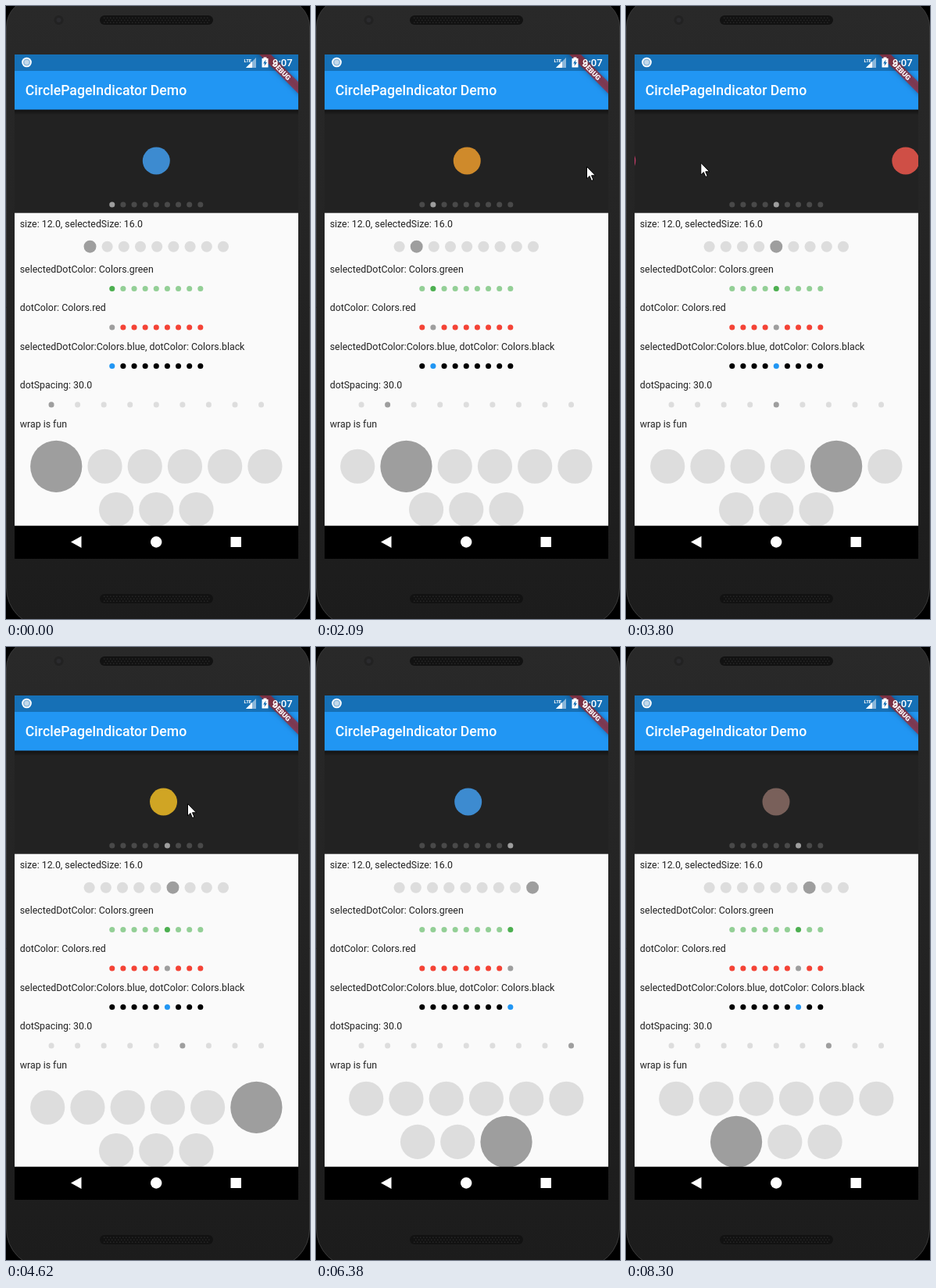
An HTML page with a canvas that plays this animation: 389 px wide and 784 px high, repeating every 9.31 s.

```html
<!DOCTYPE html>
<html lang="en">
<head>
<meta charset="utf-8">
<title>CirclePageIndicator Demo</title>
<style>
  html, body { margin: 0; width: 100%; height: 100%; overflow: hidden; background: #000; }
  canvas { display: block; }
</style>
</head>
<body>
<canvas id="stage" width="389" height="784"></canvas>
<script>
const ctx = document.getElementById('stage').getContext('2d');
const LOOP = 9310;
const DP = 363 / 411;               // device pixels to stage pixels
const LEFT = 11, RIGHT = 374, WIDTH = RIGHT - LEFT, MID = 192.3;
const APP_BAR = 83, CAROUSEL = 132.5, SAMPLES = 264.7, NAV = 664.7;
const GREY = '#9e9e9e', PALE = '#dddddd';
const PAGES = ['#3d8bd0', '#cf8a2b', '#53a456', '#cc3d6c', '#cf4f46', '#d0a524', '#79605a', '#d2c750', '#3d8bd0'];

// Every swipe is the same stroke: eight to the next page, then two back
const STROKE = 170, REST = 80, NEAR = 68, FAR = 300;
const swipes = [1430, 2400, 3190, 3650, 4182, 4698, 5470, 5790, 6850, 7520].map((press, i) => ({
  press,
  release: press + STROKE,
  from: i < 8 ? FAR : NEAR,
  to: i < 8 ? NEAR : FAR,
  page: i < 8 ? i + 1 : 15 - i
}));

// Pointer path: wandering between the strokes, then the strokes themselves
const path = [
  { t: 340, x: 270, y: 212 }, { t: 560, x: 270, y: 212 }, { t: 700, x: 252, y: 212 },
  { t: 910, x: 287, y: 212 }, { t: 1220, x: 287, y: 212 },
  { t: 2050, x: 346, y: 205 }, { t: 2170, x: 346, y: 205 }, { t: 2250, x: FAR, y: 203 },
  ...swipes.flatMap(({ press, release, from, to }) => [
    { t: press, x: from, y: 200 },
    { t: release, x: to, y: 200 },
    { t: release + REST, x: to, y: 200 }
  ])
].sort((a, b) => a.t - b.t);

function pointerAt(t) {
  if (t < 260 || (t > 6240 && t < 6600) || t > 8230) return null;
  if (t < 340) return { x: 295, y: 716 };
  const i = path.findIndex(p => p.t > t);
  if (i < 0) return path.at(-1);
  const a = path[i - 1], b = path[i], k = (t - a.t) / (b.t - a.t);
  return { x: a.x + (b.x - a.x) * k, y: a.y + (b.y - a.y) * k };
}

// The page follows the stroke, then settles exponentially after release
function pageAt(t) {
  let page = 0, goal = 0, freed = 0;
  const settle = now => goal + (page - goal) * Math.exp(-0.01 * (now - freed));
  for (const swipe of swipes) {
    if (t < swipe.press) break;
    const progress = Math.min(1, (t - swipe.press) / STROKE);
    page = settle(swipe.press) + (swipe.from - swipe.to) / WIDTH * progress;
    if (t < swipe.release) return page;
    goal = swipe.page;
    freed = swipe.release;
  }
  return settle(t);
}

function rect(x, y, w, h, color) {
  ctx.fillStyle = color;
  ctx.fillRect(x, y, w, h);
}

function circle(x, y, r, color) {
  ctx.fillStyle = color;
  ctx.beginPath();
  ctx.arc(x, y, r, 0, 7);
  ctx.fill();
}

function polygon(points, color) {
  ctx.fillStyle = color;
  ctx.beginPath();
  points.forEach(([x, y]) => ctx.lineTo(x, y));
  ctx.closePath();
  ctx.fill();
}

function text(str, x, y, size, color, weight = 400, align = 'left') {
  ctx.font = `${weight} ${size}px Roboto, sans-serif`;
  ctx.textAlign = align;
  ctx.fillStyle = color;
  ctx.fillText(str, x, y);
}

function gradient(y0, y1, from, to) {
  const fill = ctx.createLinearGradient(0, y0, 0, y1);
  fill.addColorStop(0, from);
  fill.addColorStop(1, to);
  return fill;
}

function clipped(x, y, w, h, paint) {
  ctx.save();
  ctx.beginPath();
  ctx.rect(x, y, w, h);
  ctx.clip();
  paint();
  ctx.restore();
}

// A centred row of dots; the selected one may be larger
function indicator(y, selected, { color = PALE, active = GREY, size = 8, activeSize = size, gap = 8, first = 0, count = 9 }) {
  const widths = Array.from({ length: count }, (_, i) => (i + first === selected ? activeSize : size) * DP);
  let x = MID - (widths.reduce((a, b) => a + b) + (count - 1) * gap * DP) / 2;
  widths.forEach((w, i) => {
    circle(x + w / 2, y, w / 2, i + first === selected ? active : color);
    x += w + gap * DP;
  });
}

function speaker(y) {
  ctx.fillStyle = '#121212';
  ctx.beginPath();
  ctx.roundRect(120, y, 145, 12, 6);
  ctx.fill();
  for (let row = 0; row < 3; row++)
    for (let x = 125 + row % 2 * 2; x < 261; x += 4) rect(x, y + 2.5 + row * 3, 1.5, 1.5, '#262626');
}

function phone() {
  rect(0, 0, 389, 784, '#000');
  ctx.fillStyle = gradient(0, 784, '#292929', '#1c1c1c');
  ctx.strokeStyle = '#3a3a3a';
  ctx.beginPath();
  ctx.roundRect(0.5, -9, 388, 803, [36, 36, 50, 50]);
  ctx.fill();
  ctx.stroke();
  speaker(12);
  speaker(752);
  circle(67.5, 18, 6, '#222222');
  circle(67.5, 18, 3, '#2b2b2e');
}

function carousel(page, selected) {
  rect(LEFT, CAROUSEL, WIDTH, SAMPLES - CAROUSEL, '#222222');
  clipped(LEFT, CAROUSEL, WIDTH, SAMPLES - CAROUSEL, () =>
    PAGES.forEach((color, i) => circle(MID + (i - page) * WIDTH, 198, 17.5, color)));
  rect(LEFT, CAROUSEL, WIDTH, 7, gradient(CAROUSEL, CAROUSEL + 7, 'rgba(0,0,0,.5)', 'rgba(0,0,0,0)'));
  indicator(254, selected, { color: '#494949' });
}

function samples(selected) {
  rect(LEFT, SAMPLES, WIDTH, NAV - SAMPLES + 1, '#fafafa');
  const label = (str, y) => text(str, 17.7, y, 14 * DP, '#222');
  label('size: 12.0, selectedSize: 16.0', 283);
  indicator(307.7, selected, { size: 16, activeSize: 18 });

  let y = 341;
  for (const [str, style] of [
    ['selectedDotColor: Colors.green', { color: '#93cf96', active: '#4caf50' }],
    ['dotColor: Colors.red', { color: '#f44336' }],
    ['selectedDotColor:Colors.blue, dotColor: Colors.black', { color: '#000', active: '#2196f3' }],
    ['dotSpacing: 30.0', { gap: 30 }]
  ]) {
    label(str, y);
    indicator(y + 20.5, selected, style);
    y += 56 * DP;
  }

  label('wrap is fun', y);
  y += 16.8;
  for (const [first, count] of [[0, 6], [6, 3]]) {
    const hasActive = selected >= first && selected < first + count;
    const height = (hasActive ? 75 : 50) * DP;
    indicator(y + height / 2, selected, { size: 50, activeSize: 75, first, count });
    y += height;
  }
}

function debugBanner() {
  ctx.translate(RIGHT, 62);
  ctx.rotate(Math.PI / 4);
  ctx.shadowColor = 'rgba(0,0,0,.5)';
  ctx.shadowBlur = 6;
  rect(-50, 28 * DP, 100, 12 * DP, 'rgba(183,28,28,.63)');
  ctx.shadowColor = 'transparent';
  text('DEBUG', 0, 33.2, 10.2 * DP, '#fff', 900, 'center');
}

function bars() {
  rect(LEFT, 62, WIDTH, APP_BAR - 62, '#1670b6');
  rect(LEFT, APP_BAR, WIDTH, CAROUSEL - APP_BAR, '#2196f3');
  text('CirclePageIndicator Demo', 24.8, 114, 20 * DP, '#fff', 500);
  clipped(LEFT, 62, WIDTH, 80, debugBanner);

  circle(26.5, 72, 6.3, '#fff');
  circle(26.5, 72, 4.6, '#8db9dc');
  circle(26.5, 72, 3, '#c3d9ea');
  text('LTE', 304.5, 72, 6, '#fff', 700);
  polygon([[320, 66], [320, 79], [307, 79]], '#8bb7da');
  polygon([[315, 71], [315, 79], [307, 79]], '#fff');
  rect(327.5, 67, 8, 11.5, '#fff');
  rect(329.5, 65.5, 4, 2, '#fff');
  polygon([[332.5, 68.5], [329, 73.5], [331, 73.5], [330.5, 77], [334, 72], [332, 72]], '#1670b6');
  text('9:07', 341, 77, 13, '#fff', 500);

  rect(LEFT, NAV, WIDTH, 707 - NAV, '#000');
  polygon([[83, 685.5], [96.5, 678], [96.5, 693]], '#fff');
  circle(192.2, 685.5, 7.2, '#fff');
  rect(287.5, 679, 13.5, 13, '#fff');
}

function arrow({ x, y }) {
  ctx.save();
  ctx.translate(x + 0.5, y + 0.5);
  polygon([[0, 0], [0, 15.5], [3.5, 12], [6, 18], [8.5, 17], [6, 11.3], [11, 11.3]], '#fff');
  ctx.strokeStyle = '#000';
  ctx.stroke();
  ctx.restore();
}

let start;
function draw(now) {
  start ??= now;
  const t = (now - start) % LOOP;
  const page = pageAt(t), selected = Math.round(page), pointer = pointerAt(t);
  phone();
  carousel(page, selected);
  samples(selected);
  bars();
  if (pointer) arrow(pointer);
  requestAnimationFrame(draw);
}
requestAnimationFrame(draw);
</script>
</body>
</html>
```
